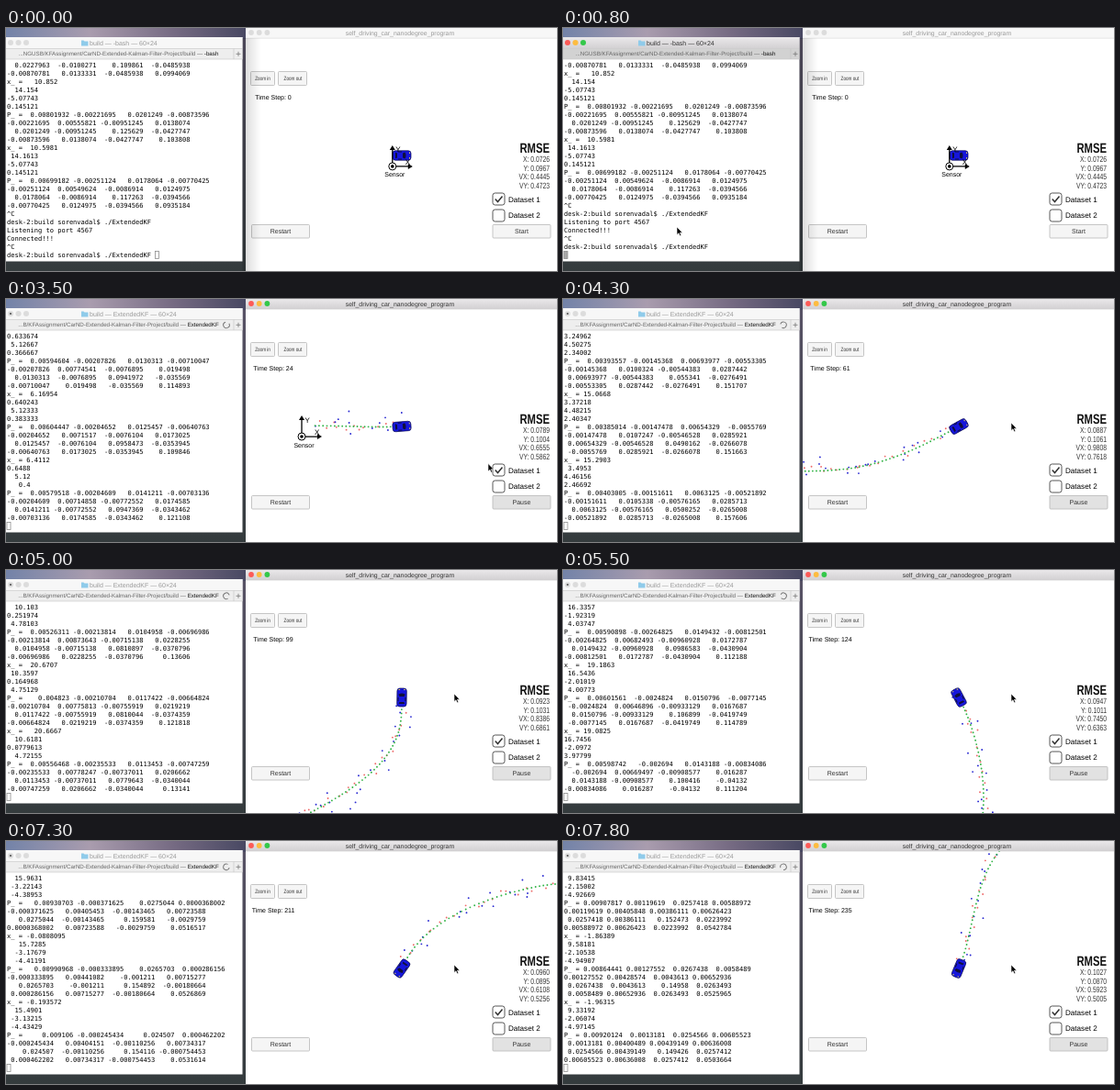
Write an HTML page that moves like this. It is 600 by 265 pixels and loops after 8000 ms.

```html
<!DOCTYPE html>
<html lang="en">
<head>
<meta charset="utf-8">
<title>Extended Kalman filter run</title>
<style>
html, body { margin: 0; width: 100%; height: 100%; overflow: hidden; }
svg { display: block; }
text { font-family: "Liberation Sans", Arial, sans-serif; font-size: 7px; text-rendering: geometricPrecision; }
.mid text, text.mid { text-anchor: middle; }
#rows text { font: 7.06px "DejaVu Sans Mono", monospace; white-space: pre; }
.bar { fill: #f7f7f7; }
.bar + text { fill: #999; }
.focus .bar { fill: url(#chrome); }
.focus .bar + text { fill: #333; }
.tab { fill: #eee; }
.focus .tab { fill: #d2d2d2; }
.lights circle { fill: #dcdcdc; }
.focus .lights :nth-child(1) { fill: #fc5b57; }
.focus .lights :nth-child(2) { fill: #fdbc40; }
.focus .lights :nth-child(3) { fill: #34c84a; }
.button rect { fill: #f5f5f5; stroke: #b8b8b8; stroke-width: .8; }
.button .pressed { fill: #e2e2e2; }
.button text { fill: #333; }
.dots { fill: none; stroke-linecap: round; stroke-width: 1.9; }
</style>
</head>
<body>
<svg width="600" height="265" viewBox="0 0 600 265">
  <defs>
    <linearGradient id="sky">
      <stop offset="0" stop-color="#7383a8"/><stop offset=".35" stop-color="#a99cae"/>
      <stop offset=".7" stop-color="#756a82"/><stop offset="1" stop-color="#484862"/>
    </linearGradient>
    <linearGradient id="ground" x2="0" y2="1">
      <stop offset="0" stop-color="#5a5468"/><stop offset="1" stop-color="#343b3d"/>
    </linearGradient>
    <linearGradient id="chrome" x2="0" y2="1">
      <stop offset="0" stop-color="#eae8ea"/><stop offset="1" stop-color="#d2d0d2"/>
    </linearGradient>
    <linearGradient id="shade">
      <stop offset="0" stop-opacity=".16"/><stop offset="1" stop-opacity="0"/>
    </linearGradient>
  </defs>
  <rect width="262" height="265" fill="url(#ground)"/>
  <rect width="262" height="12" fill="url(#sky)"/>

  <g id="terminal">
    <rect y="10" width="257.5" height="244.5" fill="#fff"/>
    <rect class="bar" y="10" width="257.5" height="12.5"/>
    <text id="title" x="91" y="18.7"></text>
    <path d="M82 13.5h2.5l1 1h4v5h-7.5z" fill="#8fcbea"/>
    <g class="lights">
      <circle cx="5" cy="16" r="3"/><circle cx="13.5" cy="16" r="3"/><circle cx="22" cy="16" r="3"/>
    </g>
    <circle id="busy" cx="5" cy="16" r="1.1" fill="#555"/>
    <rect class="tab" y="22.5" width="257.5" height="11.5"/>
    <path d="M0 22.5h257.5M0 34h257.5M248 22.5v11.5" stroke="#c4c4c4" stroke-width=".6"/>
    <text class="mid" x="122.5" y="30.4" fill="#666" style="font-size:6.2px"><tspan id="path"></tspan><tspan id="program" fill="#111"></tspan></text>
    <path d="M250.5 28.3h5M253 25.8v5" stroke="#777" stroke-width=".8"/>
    <circle id="spinner" cx="240" cy="28.3" r="3.3" fill="none" stroke="#777" stroke-dasharray="16 4.7"/>
    <g id="rows"></g>
    <rect id="caret" y="243.5" width="4" height="8" stroke="#8c8c8c" stroke-width=".8"/>
  </g>

  <g id="simulator">
    <rect x="261" width="339" height="265" fill="#fff"/>
    <svg x="261" y="11" width="339" height="254" viewBox="261 11 339 254">
      <g id="world">
        <path id="lidar" class="dots" stroke="#ee6a6a"/>
        <path id="radar" class="dots" stroke="#2a2ad2"/>
        <path id="estimate" class="dots" stroke="#34b448"/>
      </g>
      <g id="car">
        <rect x="-10" y="-5.2" width="20" height="10.4" rx="3" fill="#1616dc" stroke="#0a0a50" stroke-width=".7"/>
        <path d="M3.5-3.6q2 3.6 0 7.2l-2.5-1v-5.2zM-7-3.3l2 .8v5l-2 .8z" fill="#10103c"/>
        <path d="M-4-4h4M-4 4h4" stroke="#10103c"/>
        <path d="M8.5-3.6v1.6M8.5 2v1.6" stroke="#d6c85a"/>
      </g>
      <g id="sensor">
        <path d="M0 0V-19M0 0H18" stroke="#000" stroke-width="1.3"/>
        <path d="M0-23l3 5h-6zM22 0l-5-3v6z"/>
        <circle r="4" fill="#fff" stroke="#000"/><circle r="1.8"/>
        <text x="3.5" y="-15.5" style="font-size:8px">Y</text>
        <text x="14" y="-2" style="font-size:8px">X</text>
        <text class="mid" x="2.5" y="11.5">Sensor</text>
      </g>
    </svg>
    <rect class="bar" x="261" width="339" height="11"/>
    <text class="mid" x="429" y="8" style="font-size:6.9px">self_driving_car_nanodegree_program</text>
    <g class="lights">
      <circle cx="267" cy="5" r="2.9"/><circle cx="275.7" cy="5" r="2.9"/><circle cx="284.4" cy="5" r="2.9"/>
    </g>
    <path d="M261 11.2h339" stroke="#ccc" stroke-width=".5"/>
    <g class="button mid">
      <rect x="266.5" y="47.5" width="26" height="15" rx="1"/>
      <rect x="296.5" y="47.5" width="31" height="15" rx="1"/>
      <rect x="267.5" y="214.5" width="63" height="14.5" rx="1"/>
      <rect id="switch" x="530" y="214.5" width="63" height="14.5" rx="1"/>
      <g transform="scale(.75 1)">
        <text x="372.7" y="57.2" style="font-size:6.2px">Zoom in</text>
        <text x="416.5" y="57.2" style="font-size:6.2px">Zoom out</text>
      </g>
      <text x="299" y="224.3">Restart</text>
      <text id="toggle" x="561.5" y="224.3"></text>
    </g>
    <text id="step" class="mid" x="291" y="77.5"></text>
    <g transform="translate(592 0) scale(.75 1)" text-anchor="end" fill="#333">
      <text y="135.5" fill="#111" style="font-size:15px;font-weight:bold">RMSE</text>
      <g id="rmse" style="font-size:9px"></g>
    </g>
    <g fill="#fff" stroke="#444" stroke-width=".9">
      <rect x="530" y="180" width="13" height="13" rx="2.5"/>
      <rect x="530" y="198" width="13" height="13" rx="2.5"/>
      <path d="M532.7 186.500l2.8 3 5-6" fill="none" stroke="#333" stroke-width="1.5"/>
    </g>
    <text x="547" y="189.5" style="font-size:8.1px">Dataset 1</text>
    <text x="547" y="207" style="font-size:8.1px">Dataset 2</text>
  </g>
  <rect id="shadow" x="257.5" y="11" width="20" height="254" fill="url(#shade)"/>
  <path id="mouse" d="M0 0v8.5l2-1.8 1.4 3 1.4-.7-1.4-2.8h2.7z" stroke="#fff" stroke-width=".6"/>
</svg>
<script>
const $ = id => document.getElementById(id);
const SCALE = 17, ROWS = 24, CHAR = 4.25, DT = .05;
const random = n => { const v = Math.sin(n * 127.1 + 3) * 43758.5; return v - Math.floor(v); };
const mix = (a, b, u) => a + (b - a) * u;

// Key moments: state is x, y, vx, vy; cov is the upper triangle of the covariance.
const oldRun = {
  state: [10.5981, 14.1613, -5.07743, .145121],
  cov: [.00699182, -.00251124, .0178064, -.00770425, .00549624, -.0086914, .0124975, .117263, -.0394566, .0935184]
};
const scenes = [
  { tick: 12, step: 0, state: [.6, .7, 5.2, 0], cov: oldRun.cov, rmse: [.0726, .0967, .4445, .4723] },
  {
    tick: 17, step: 61, state: [15.2903, 3.4953, 4.46156, 2.46692], rmse: [.0887, .1061, .9808, .7618],
    cov: [.00403005, -.00151611, .0063125, -.00521892, .0105338, -.00576165, .0285713, .0500252, -.0265008, .157606]
  },
  {
    tick: 22, step: 124, state: [19.0825, 16.7456, -2.0972, 3.97799], rmse: [.0947, .1011, .745, .6363],
    cov: [.00598742, -.002694, .0143188, -.00834086, .00669497, -.00908577, .016287, .100416, -.04132, .111204]
  },
  {
    tick: 26, step: 174, state: [8.62684, 20.7696, -4.97491, -.904722], rmse: [.0857, .0933, .6392, .5642],
    cov: [.010405, -.00269233, .0277268, -.00806945, .00477191, -.00938128, .00838364, .151263, -.0416902, .0601377]
  },
  {
    tick: 31, step: 235, state: [-1.96315, 9.33192, -2.06074, -4.97145], rmse: [.1027, .087, .5923, .5005],
    cov: [.00920124, .0013181, .0254566, .00605523, .00400489, .00439149, .00636008, .149426, .0257412, .0503664]
  }
];
const keysOf = name => scenes.map(s => [s.step, ...s[name]]);

// Finds the pair of keys around x; each key starts with its position.
function span(keys, x) {
  let i = 1;
  while (i < keys.length - 1 && keys[i][0] < x) i++;
  const a = keys[i - 1], b = keys[i];
  return [a, b, Math.max(0, Math.min(1, (x - a[0]) / (b[0] - a[0])))];
}
function track(keys, x) {
  const [a, b, u] = span(keys, x);
  return a.slice(1).map((v, i) => mix(v, b[i + 1], u));
}

// The drive: key states and three bends, joined by cubic Hermite curves.
const bends = [[30, 7.9, .75, 5.1, .5], [93, 20.6, 9.1, .6, 4.9], [205, .63, 16.86, -3.4, -4.3]];
const route = [...keysOf('state'), ...bends].sort((a, b) => a[0] - b[0]);
function motion(step) {
  const [a, b, u] = span(route, step), T = (b[0] - a[0]) * DT, w = 1 - u;
  const place = i => (1 + 2 * u) * w * w * a[i] + u * u * (3 - 2 * u) * b[i]
    + T * u * w * (w * a[i + 2] - u * b[i + 2]);
  return [place(1), place(2), mix(a[3], b[3], u), mix(a[4], b[4], u)];
}

const vary = (list, seed, amount) => list.map((v, i) => v * (1 + amount * (random(seed * 14 + i) - .5)));
const covKeys = keysOf('cov');
function record(step) {
  const known = scenes.find(s => s.step === step);
  return known || { state: motion(step), cov: vary(track(covKeys, step), step, .15) };
}
function earlier({ state: [x, y, vx, vy], cov }, seed) {
  return { state: [x - vx * DT, y - vy * DT, vx, vy], cov: vary(cov, seed, .3) };
}

function pad(list) {
  const words = list.map(v => String(+v.toPrecision(6)));
  const width = Math.max(...words.map(w => w.length));
  return words.map(w => w.padStart(width));
}
function block({ state, cov }) {
  const [a, b, c, d, e, f, g, h, i, j] = cov;
  const p = pad([a, b, c, d, b, e, f, g, c, f, h, i, d, g, i, j]);
  const matrix = [0, 4, 8, 12].map(n => p.slice(n, n + 4).join(' '));
  const lines = [...pad(state), ...matrix];
  lines[0] = 'x_ = ' + lines[0];
  lines[4] = 'P_ = ' + lines[4];
  return lines;
}

const command = 'desk-2:build sorenvadal$ ./ExtendedKF';
const greeting = ['Listening to port 4567', 'Connected!!!'];
const before = earlier(oldRun, 1);
const history = [
  ...[earlier(before, 2), before, oldRun].flatMap(block),
  '^C', command, ...greeting, '^C', command
];
function screen(tick, step) {
  const lines = step > 2
    ? [step - 2, step - 1, step].map(record).flatMap(block)
    : [...history, ...greeting.slice(0, (tick > 3) + (tick > 6))];
  if (tick > 1) lines.push('');
  return lines.slice(-ROWS);
}

const stepKeys = scenes.map(s => [s.tick, s.step]);
const rmseKeys = keysOf('rmse');
const mouseKeys = [[3, 124, 217], [6, 434, 182], [10, 434, 182], [11, 562, 224], [13, 562, 224], [15, 488, 135]];

function addText(parent, x, y) {
  const el = document.createElementNS('http://www.w3.org/2000/svg', 'text');
  el.setAttribute('x', x);
  el.setAttribute('y', y);
  el.style.fontSize = 'inherit';
  return parent.appendChild(el);
}
const rows = Array.from({ length: ROWS }, (_, i) => addText($('rows'), 1, 43 + 9 * i));
rows.forEach(row => row.style.fontSize = '');
const errors = ['X', 'Y', 'VX', 'VY'].map((name, i) => ({ name, el: addText($('rmse'), 0, 145.8 + 9.8 * i) }));

const dot = (x, y) => `M${(x * SCALE).toFixed(1)} ${(-y * SCALE).toFixed(1)}h0`;
const dots = { estimate: [], lidar: [], radar: [] };
for (let s = 1; s <= 235; s++) {
  const [x, y] = motion(s);
  const offset = seed => random(s + seed) + random(s + seed + 500) - 1;
  const noisy = size => dot(x + size * offset(0), y + size * offset(900));
  dots.estimate.push(dot(x, y));
  dots.lidar.push(s % 2 ? noisy(.4) : '');
  dots.radar.push(s % 2 ? '' : noisy(1.1));
}

const set = (id, name, value) => $(id).setAttribute(name, value);
const show = (id, on) => set(id, 'visibility', on ? 'visible' : 'hidden');
function draw(tick) {
  const step = Math.round(track(stepKeys, tick)[0]);
  const [x, y, vx, vy] = motion(step);
  const simFocus = tick > 6, termFocus = tick > 1 && !simFocus, running = tick > 3, driving = tick > 11;
  $('terminal').classList.toggle('focus', termFocus);
  $('simulator').classList.toggle('focus', simFocus);
  show('shadow', !simFocus);

  const program = running ? 'ExtendedKF' : '-bash';
  $('title').textContent = `build — ${program} — 60×24`;
  $('path').textContent = `...${running ? '' : 'NGUS'}B/KFAssignment/CarND-Extended-Kalman-Filter-Project/build — `;
  $('program').textContent = program;
  show('busy', running);
  show('spinner', running);
  set('spinner', 'transform', `rotate(${tick * 75} 240 28.3)`);
  const lines = screen(tick, step);
  rows.forEach((row, i) => row.textContent = lines[i]);
  set('caret', 'x', 1 + (tick < 2 ? 38 * CHAR : 0));
  set('caret', 'fill', termFocus ? '#a8a8a8' : 'none');

  const camera = `translate(${431 - x * SCALE} ${139 + y * SCALE})`;
  set('world', 'transform', camera);
  set('sensor', 'transform', camera);
  set('car', 'transform', `translate(431 139) rotate(${-Math.atan2(vy, vx) * 180 / Math.PI})`);
  for (const id in dots) set(id, 'd', dots[id].slice(0, step).join(''));
  $('step').textContent = 'Time Step: ' + step;
  $('toggle').textContent = driving ? 'Pause' : 'Start';
  $('switch').classList.toggle('pressed', driving);
  const rmse = track(rmseKeys, step);
  errors.forEach(({ name, el }, i) => el.textContent = `${name}: ${rmse[i].toFixed(4)}`);

  show('mouse', tick > 1);
  set('mouse', 'transform', `translate(${track(mouseKeys, tick)})`);
}

let shown = -1;
function play() {
  const t = performance.now() % 8000;
  const tick = 2 * Math.floor(t / 500) + (t % 500 >= 300);
  if (tick !== shown) draw(shown = tick);
  requestAnimationFrame(play);
}
play();
</script>
</body>
</html>
```
